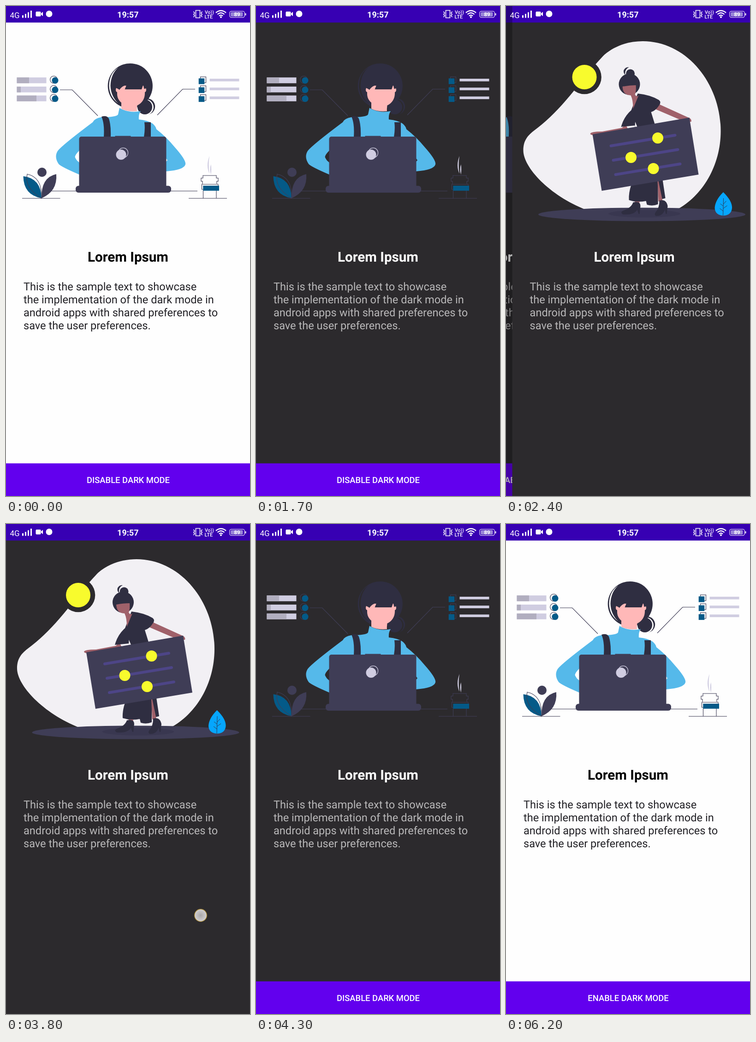
Animation, 529 px wide and 1058 px high, one loop 6.3 s. Source, as an HTML page:

```html
<!DOCTYPE html>
<html lang="en">
<head>
<meta charset="utf-8">
<title>Dark mode demo</title>
<style>
  html, body { margin: 0; width: 100%; height: 100%; overflow: hidden; background: #2c2a2d; }
  svg { display: block; width: 100%; height: 100%; }
  text { font-family: Roboto, sans-serif; text-rendering: geometricPrecision; }
  .light { --bg: #fefefe; --title: #000; --body: #222126; }
  .dark { --bg: #2c2a2d; --title: #fff; --body: #b9b8b9; }
  .bg { fill: var(--bg); }
  .title { font-size: 29.6px; font-weight: 700; text-anchor: middle; fill: var(--title); }
  .body { font-size: 23.6px; fill: var(--body); }
  .button { font-size: 18.4px; font-weight: 500; text-anchor: middle; fill: #fff; }
  .line { fill: none; stroke: #3f3d56; stroke-width: 1.1; }
  .slate { fill: #3f3d56; }
  .hair { fill: #2f2e41; }
  .sea { fill: #045a88; }
  .pale { fill: #d0cde1; }
  .shade { fill: #b1aebf; }
  .skin { fill: #ffb8b8; }
  .tan { fill: #a0616a; }
  .sun { fill: #f8fb2d; }
  .cloud { fill: #f2f0f4; }
  .icon { fill: none; stroke: #fff; stroke-width: 1.6; }
</style>
</head>
<body>
<svg viewBox="0 0 529 1058" preserveAspectRatio="none">
  <defs>
    <radialGradient id="touch">
      <stop offset="0" stop-color="#a9a7a9"/><stop offset="1" stop-color="#d3d1d3"/>
    </radialGradient>
    <g id="copy">
      <text class="title" x="264.5" y="552">Lorem Ipsum</text>
      <g class="body">
        <text x="38" y="614.3">This is the sample text to showcase</text>
        <text x="38" y="642.3">the implementation of the dark mode in</text>
        <text x="38" y="670.3">android apps with shared preferences to</text>
        <text x="38" y="698.3">save the user preferences.</text>
      </g>
    </g>
    <rect id="bar" fill="#3700b3" width="529" height="35.7"/>
    <g id="bullet">
      <circle class="line" cx="103.5" cy="159" r="7.8"/>
      <circle class="sea" cx="106.5" cy="160.8" r="7"/>
    </g>
    <g id="item">
      <rect class="line" x="421.5" y="153" width="12" height="12.5"/>
      <rect class="sea" x="417.7" y="156.3" width="12.6" height="12.4"/>
      <rect class="pale" x="441.5" y="157" width="64" height="5.7"/>
    </g>
  </defs>

  <g id="home">
    <rect class="bg" width="529" height="1058"/>
    <use href="#bar"/>

    <!-- lists and connectors -->
    <path class="pale" d="M23.5 154.3h64v12.4h-64zM23.5 174h64v12.4h-64zM23.5 193.3h64v12.4h-64z"/>
    <path class="shade" d="M23.5 154.3h26.5v12.4h-26.5zM23.5 174h8.5v12.4h-8.5zM23.5 193.3h42.5v12.4h-42.5z"/>
    <use href="#bullet"/><use href="#bullet" y="20.3"/><use href="#bullet" y="39.5"/>
    <use href="#item"/><use href="#item" y="19.2"/><use href="#item" y="38.4"/>
    <path class="line" d="M117 181H143.5L199 237M410 179.5H383L328 235.5M98 399.5H415M35 415.3H117.5M396 415.3H479"/>

    <!-- woman -->
    <circle class="hair" cx="306" cy="217" r="17.2"/>
    <circle class="bg" cx="303" cy="218.5" r="17"/>
    <circle class="hair" cx="301" cy="218" r="16"/>
    <circle class="hair" cx="269.3" cy="172.5" r="48.6"/>
    <path class="bg" d="M243 133Q224 146 223.5 172Q224 196 243 210Q227 194 226.5 172Q227 148 243 133Z"/>
    <path fill="#55b9ea" d="M246 220Q266 232 292 227Q287 234 288 245Q308 247 318 254Q325 260 326 266Q348 283 366 305Q391 333 389 342Q386 354 347 357V364H159Q119 347 114 341Q104 326 112 313Q121 301 188 251Q191 243 207 240Q240 240 243 234Z"/>
    <path class="bg" d="M159 312Q150 321 149.5 326Q152 333 159 338ZM347 329L350 333L347 336Z"/>
    <path class="skin" d="M250 205H287Q283 216 284 227Q265 229 250 222Z"/>
    <path class="skin" d="M241 172H301V190Q300 206 286 214Q271 220 256 213Q241 204 241 190Z"/>
    <ellipse class="skin" cx="241" cy="181" rx="3" ry="5"/>
    <ellipse class="skin" cx="301" cy="181" rx="3" ry="5"/>
    <path class="hair" d="M239 155H303V178L299.5 179L297.5 170L294 180H257.500L261.500 170Q250 174 246 181L243 179L239 177Z"/>
    <path class="hair" d="M207 239Q218 235 223 243Q228 258 227 283H212Q214 254 207 239ZM300 251H314V283H299Q302 265 300 251Z"/>

    <!-- laptop -->
    <rect class="slate" x="236.5" y="280.5" width="34" height="5"/>
    <rect class="slate" x="158.5" y="282" width="189" height="115" rx="5"/>
    <rect class="slate" x="151" y="388.3" width="207" height="14.7" rx="6"/>
    <circle class="pale" cx="249.5" cy="321" r="11"/>
    <circle class="line" cx="254" cy="317" r="10.6" style="stroke:#d0cde1"/>

    <!-- plant -->
    <circle class="slate" cx="78" cy="359" r="10"/>
    <path class="slate" d="M77 415Q76 370 109 363Q112 400 77 415Z"/>
    <path class="sea" d="M77 415Q38 408 37.5 367.5Q76 372 77 415Z"/>
    <path class="line" d="M77 415Q39 392 46 363Q79 370 77 415Z"/>

    <!-- coffee -->
    <path class="line" d="M426 384V378.5H423V371.5H427V366H456V371.5H460V378.5H457V384M424.5 385H460V396H424.5ZM427.5 398V415M456 398V415"/>
    <rect class="sea" x="427.3" y="388" width="34.7" height="10.8"/>
    <path class="pale" d="M441 324Q433 345 441 362Q438 343 441 324ZM444.3 342Q441 352 444.3 364Q446 352 444.3 342Z"/>

    <use href="#copy"/>
    <rect fill="#6200ee" y="987.5" width="529" height="70.5"/>
    <text id="label" class="button" x="265" y="1030.3"></text>
    <rect id="dim" width="529" height="1058"/>
  </g>

  <g id="detail" class="dark">
    <rect class="bg" width="529" height="1058"/>
    <use href="#bar"/>
    <path class="cloud" d="M283 76C378 76 452 167 452 270C452 345 412 411 356 440H160C80 409 24 348 24 312C24 292 32 281 46 270C80 245 105 218 133 184C160 150 183 122 200 105C225 84 255 76 283 76Z"/>
    <circle class="bg" cx="156.5" cy="153.5" r="36.8"/>
    <circle class="sun" cx="156.5" cy="153.5" r="26.5"/>
    <ellipse class="slate" cx="281" cy="450" rx="224.5" ry="14.5"/>
    <ellipse fill="#393750" cx="286.5" cy="448.5" rx="78" ry="8"/>

    <!-- woman with board -->
    <path class="hair" d="M258 386Q252 404 253 419Q270 425 290 421L292 429Q304 433 316 428V378ZM316 377L326 375L332 415L324 417Z"/>
    <path class="tan" d="M315 379L317 378L326 421L317 422ZM266 422L276 422L275 430H265Z"/>
    <path class="hair" d="M262 424Q278 420 278 432L276 449H274L271 440Q264 452 240 450Q233 446 240 442Q258 436 262 424ZM319 420Q334 416 337 432L335 449H333L331 440Q325 455 311 453Q307 450 311 445Q319 436 319 420Z"/>
    <path class="tan" d="M316 211L380 240Q390 243 388 250L372 249L311 223Z"/>
    <path class="tan" d="M246 256L238 263L195 271Q170 271 169 276Q171 280 185 279L252 268Z"/>
    <path class="hair" d="M272 189Q300 192 318 203Q324 208 318 215Q311 226 301 229L310 258L266 266V258L236 261Q242 239 258 225Z"/>
    <path class="cloud" d="M266.5 250L272 263H266Z"/>
    <circle class="hair" cx="254" cy="169" r="23"/>
    <circle class="hair" cx="256" cy="146" r="9.5"/>
    <path class="hair" d="M253 132Q243 137 245 149Q240 144 242 138Q246 131 253 132Z"/>
    <path class="tan" d="M239 174Q254 171 268 171Q269 184 266 191Q270 198 274 193L262 222Q262 203 257 193Q240 193 239 174Z"/>
    <path class="slate" d="M174 277L384 241L404 364L194 399Z"/>
    <path fill="none" stroke="#4d4587" stroke-width="6" stroke-linecap="round" d="M214 302L353 279M219 333L359 310M224 364L364 341"/>
    <circle class="sun" cx="315.5" cy="285" r="12"/>
    <circle class="sun" cx="257.5" cy="327" r="12"/>
    <circle class="sun" cx="306" cy="351" r="12"/>

    <path fill="#06a6fd" d="M457.5 402Q477 421 476.5 436Q475 452 458 452.5Q440 452 439 436Q440 419 457.5 402Z"/>
    <path fill="none" stroke="#2f2e41" stroke-width=".9" d="M458 415L457 452M457.5 428L464 421M457.5 437L466 431M457.5 432L451 427M457.5 443L450 437"/>
    <use href="#copy"/>
  </g>

  <circle id="finger" r="13.3" fill="url(#touch)" stroke="#b08f35" stroke-width="1.3"/>

  <!-- status icons stay put while the pages slide -->
  <g fill="#fff">
    <text x="8.5" y="25.5" font-size="17">4G</text>
    <path d="M35 20h3v5.5h-3zM41 17h3v8.5h-3zM47 13.5h3v12h-3zM53 10h3v15.5h-3z"/>
    <rect x="64.5" y="12" width="11" height="10.5" rx="2"/>
    <path d="M76 16L80 12.5V22L76 18.5Z"/>
    <circle cx="93.5" cy="17" r="7"/>
    <text x="264.3" y="25" font-size="18" font-weight="700" text-anchor="middle">19:57</text>
    <g font-size="11" font-weight="500">
      <text x="431" y="16.5" font-size="10.5">Vo))</text>
      <text x="430.5" y="26.5">LTE</text>
    </g>
    <circle cx="466" cy="24" r="2"/>
    <rect x="518.5" y="15.5" width="2" height="5" rx="1"/>
  </g>
  <path class="icon" d="M411.5 9.5h9v16h-9zM406.5 12l2.5 3l-2 3l2 3l-2.500 3M425.5 12l-2.5 3l2 3l-2 3l2.5 3"/>
  <path class="icon" style="stroke-width:2.3" d="M455 14.5Q466 5.5 477 14.5M458.5 18Q466 11.5 473.5 18M462 21.5Q466 18 470 21.5"/>
  <rect x="484.8" y="11.3" width="32.5" height="13.5" rx="4" class="icon" style="stroke-width:1.1"/>
  <rect x="487" y="13.3" width="26.5" height="9.5" rx="2" fill="#9a86d8"/>
  <text x="501" y="22" font-size="11.5" font-weight="700" text-anchor="middle" fill="#fff">89</text>
</svg>
<script>
  const LOOP = 6300, STEP = 100, WIDTH = 529, SLIDE = 350;
  const OPEN_AT = 2190, CLOSE_AT = 3894;
  const home = document.getElementById('home');
  const detail = document.getElementById('detail');
  const dim = document.getElementById('dim');
  const label = document.getElementById('label');
  const finger = document.getElementById('finger');

  // Share of the slide still to go, decelerating.
  const remaining = (t, start) => (1 - Math.min(1, Math.max(0, (t - start) / SLIDE))) ** 4;

  // Touches: from and to in ms, start x, y, speed in px per ms.
  const touches = [
    { from: 2100, to: 2200, x: 400, y: 845, speed: -2 },
    { from: 3600, to: 3800, x: 242, y: 845, speed: 0.9 },
    { from: 5200, to: 5400, x: 300, y: 1020, speed: 0 },
  ];

  function draw(t) {
    const dark = t >= 100 && t < 5600;
    home.setAttribute('class', dark ? 'dark' : 'light');
    label.textContent = (t < 5600 ? 'DISABLE' : 'ENABLE') + ' DARK MODE';

    const left = t < CLOSE_AT ? remaining(t, OPEN_AT) : 1 - remaining(t, CLOSE_AT);
    const cover = 1 - left;
    home.setAttribute('transform', `translate(${-0.4 * WIDTH * cover})`);
    detail.setAttribute('transform', `translate(${WIDTH * left})`);
    dim.setAttribute('opacity', 0.3 * cover);

    const touch = touches.find(p => t >= p.from && t <= p.to);
    finger.setAttribute('visibility', touch ? 'visible' : 'hidden');
    if (touch) {
      finger.setAttribute('cx', touch.x + touch.speed * (t - touch.from));
      finger.setAttribute('cy', touch.y);
    }
  }

  const start = performance.now();
  function tick() {
    const t = (performance.now() - start) % LOOP;
    draw(Math.floor(t / STEP) * STEP);
    requestAnimationFrame(tick);
  }
  tick();
</script>
</body>
</html>
```
